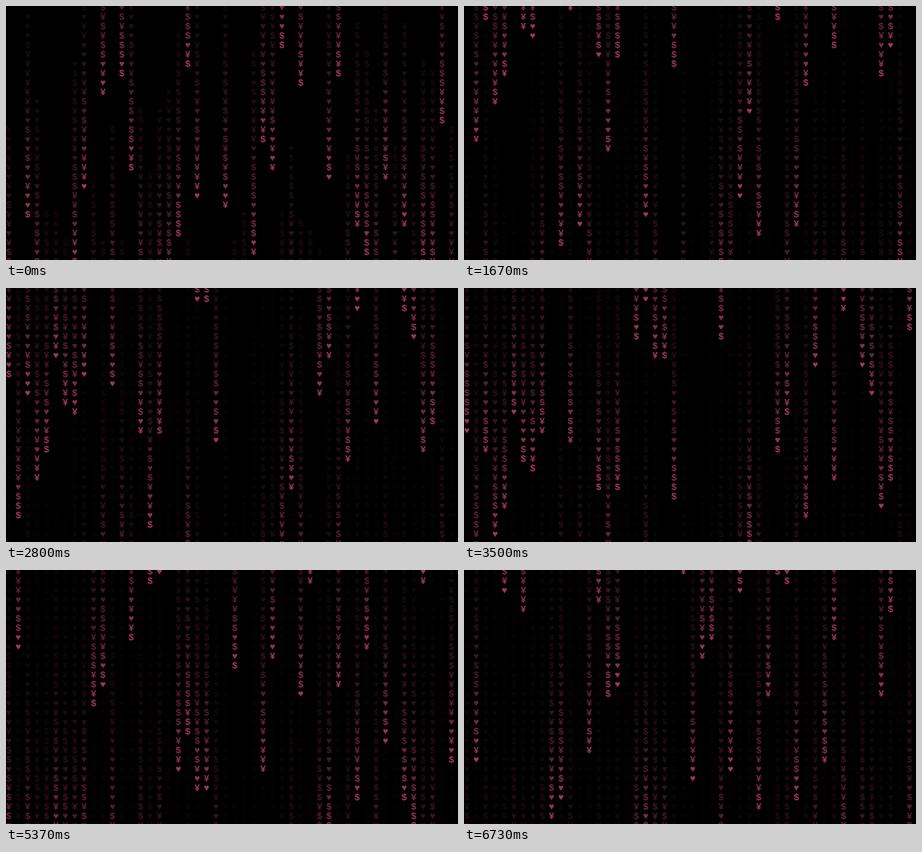
Write an HTML page with a canvas that moves like this. It is 720 by 405 pixels and loops after 6.86 s.

```html
<!DOCTYPE html>
<html>
<head>
<meta charset="utf-8">
<style>
  html, body { margin: 0; width: 100%; height: 100%; overflow: hidden; background: #000; }
  canvas { display: block; }
</style>
</head>
<body>
<canvas id="rain" width="720" height="405"></canvas>
<script>
const ctx = document.getElementById('rain').getContext('2d');
const CELL = 15, ROWS = 28, LOOP = 6860;
const FIRST = 21;   // rows fallen before the loop starts
const FADE = 0.91, RESIDUE = 0.045;
const GLYPHS = '$¥♥';

// Moments of the two-row steps, repeating every 3000 ms
const BEATS = [70, 300, 500, 730, 970, 1200, 1430, 1670, 1900, 2130, 2370, 2600, 2800];

// Head row of each drop at time 0, per column
const DROPS = [
  [34, -17], [-2, -40], [22, -15], [31, -6], [43, -9, -58], [43, -19],
  [46, -14, -56], [27, -13], [19, -17], [40, -34], [46, 9, -36], [34, -16],
  [46, 7], [17, -41], [32, -11, -57], [39, -1, -47], [32, -11, -48], [30],
  [24, -27], [46, 6, -31], [20, -25], [-25], [-10], [21, -60],
  [46, -38], [43, -51], [26, -53], [14, -27], [17, -39], [43, 4, -58],
  [36, -5], [44, 8, -35], [45, -47], [47, -15, -60], [18, -19, -59], [7, -36],
  [37, -8], [23, -24], [26, -40], [32, -12, -53], [18, -30], [36],
  [23, -24], [42, -21], [27, -9, -47], [28, -12, -56], [12], [34, -28]
];

function glyph(col, row, drop) {
  const s = Math.sin(col * 127.1 + row * 311.7 + drop * 74.7) * 43758.5453;
  return GLYPHS[Math.floor((s - Math.floor(s)) * 3)];
}

function rowsFallen(t) {
  const done = BEATS.filter(b => b <= t % 3000).length;
  return 2 * (Math.floor(t / 3000) * BEATS.length + done);
}

function draw(fallen) {
  ctx.globalAlpha = 1;
  ctx.fillStyle = '#000';
  ctx.fillRect(0, 0, 720, 405);
  ctx.fillStyle = '#a2375f';
  ctx.font = 'bold 15px "Liberation Mono", monospace';
  DROPS.forEach((drops, col) => drops.forEach((start, i) => {
    const head = start + fallen;
    for (let row = Math.max(0, start - FIRST); row <= head && row < ROWS; row++) {
      ctx.globalAlpha = Math.max(RESIDUE, FADE ** (head - row));
      ctx.fillText(glyph(col, row, i), col * CELL, row * CELL + 7);
    }
  }));
}

const origin = performance.now();
let shown = -1;
function tick() {
  const fallen = rowsFallen((performance.now() - origin) % LOOP);
  if (fallen !== shown) draw(shown = fallen);
  requestAnimationFrame(tick);
}
tick();
</script>
</body>
</html>
```
